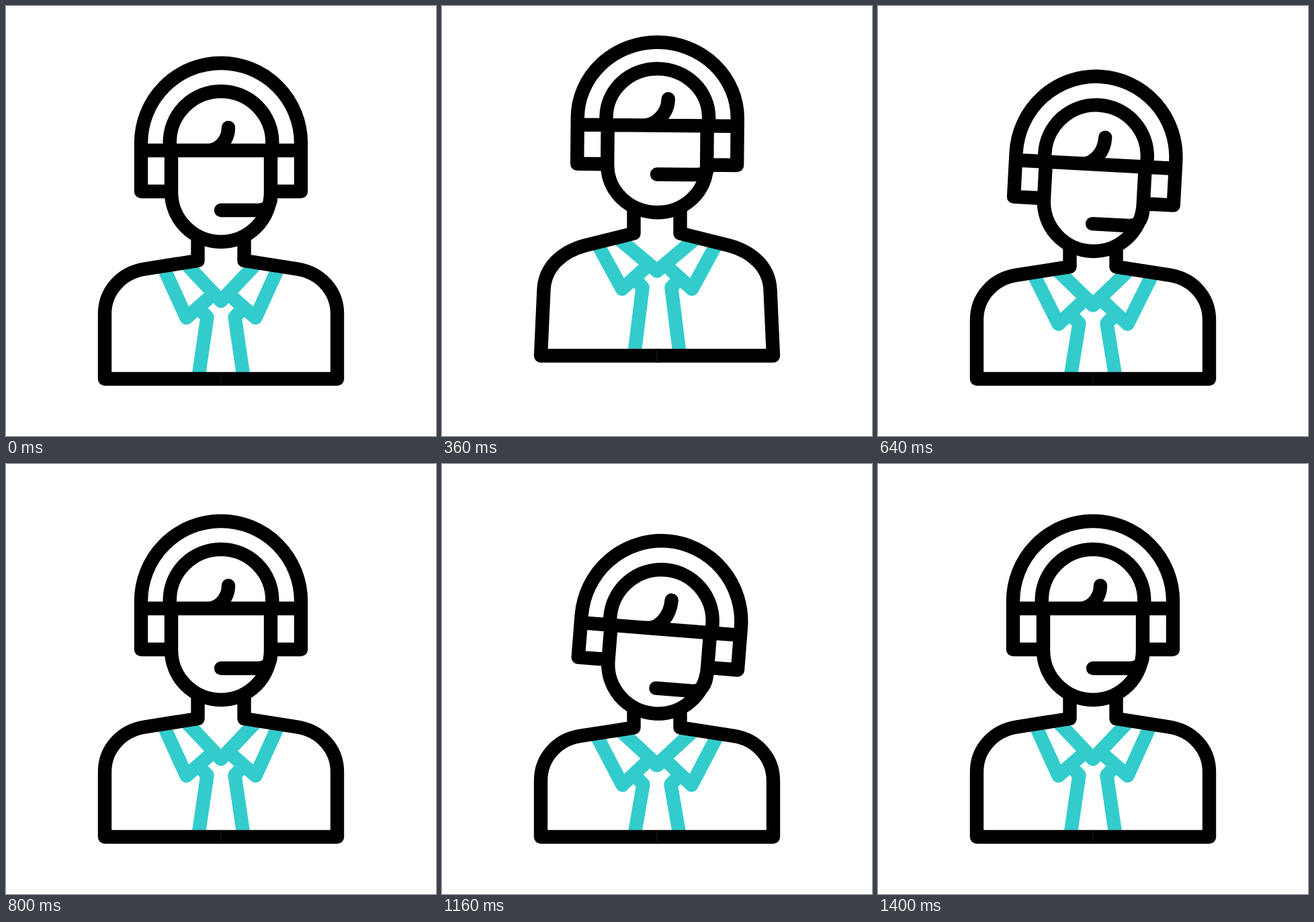
Write an HTML page that moves like this. It is 640 px wide and 640 px high and loops after 1480 ms.

```html
<!DOCTYPE html>
<html lang="en">
<head>
<meta charset="utf-8">
<title>Support agent</title>
<style>
  html, body { margin: 0; height: 100%; overflow: hidden; background: #fff; }
  svg { display: block; width: 100%; height: 100%; }
  path { fill: none; stroke: #000; stroke-width: 20.4; stroke-linejoin: round; }
  #body, #head { stroke-linecap: round; }
  #shirt { stroke: #3cc; }
  #seam { stroke: #fff; stroke-opacity: .16; stroke-width: .8; }
</style>
</head>
<body>
<svg viewBox="0 0 640 640">
  <g id="half">
    <path id="shirt"/>
    <path id="body"/>
  </g>
  <use href="#half" transform="matrix(-1 0 0 1 640 0)"/>
  <path id="seam"/>
  <path id="head"/>
</svg>
<script>
const LOOP = 1480, STEP = 40;
const $ = id => document.getElementById(id);

// [time, lift, nod]
const KEYS = [
  [0, 0, 0], [120, 0, 0], [320, 1, 0], [520, 0, 1], [800, 0, 0],
  [1000, 0, 0], [1200, 0, 1], [1400, 0, 0], [LOOP, 0, 0]
];

function poseAt(t) {
  const i = KEYS.findIndex(key => key[0] > t);
  const [t0, lift0, nod0] = KEYS[i - 1], [t1, lift1, nod1] = KEYS[i];
  const p = (t - t0) / (t1 - t0), s = p * p * (3 - 2 * p);
  return { lift: lift0 + (lift1 - lift0) * s, nod: nod0 + (nod1 - nod0) * s };
}

function draw(t) {
  const { lift, nod } = poseAt(t);
  // A rest value plus its shifts at full lift and full nod.
  const mix = (rest, up, down) => rest + up * lift + down * nod;
  const pt = (x, y, upX, upY, downX, downY) =>
    `${mix(x, upX, downX)} ${mix(y, upY, downY)} `;

  // Left half of the torso; the right half is mirrored.
  const base = mix(555, -38.5, 0);
  $('body').setAttribute('d',
    'M' + pt(285.5, 345, 0, -47.5, 0, 23.5) +
    'L' + pt(285.5, 379, 0, -47, 0, 15) +
    'L' + pt(206, 391.5, 8, -41, -1, 15) +
    'C' + pt(172, 397, 8, -37, -1, 15) +
          pt(147, 424, 7, -42, 0, 15) +
          pt(147, 458, 5, -42, 0, 15) +
    `L147 ${base}H320`);

  $('shirt').setAttribute('d',
    'M' + pt(268, 384, -8, -46, -2, 15) +
    'L' + pt(320, 439, 0, -51, 1, 10.5) +
    'L' + pt(323, 436, 0, -51, 1, 10.5) +
    'M' + pt(233, 386, -2, -39, -5, 17) +
    'L' + pt(268.5, 464, -.5, -49.5, 0, 15.5) +
    'L' + pt(305, 432, 0, -51, 0, 12.5) +
    'M' + pt(288, 451, 0, -51, 0, 15.5) +
    'L' + pt(299.5, 463, -1, -51, 0, 15.5) +
    `L286 ${base}`);

  $('seam').setAttribute('d', `M320 ${base - 10}v20`);

  // Head, measured from the middle of the ear pads' lower edge.
  const band = mix(-191, 9, 9), hair = mix(-149, 6, 10), brow = mix(-61, 2, 10.4);
  const chin = mix(75, -4, -.5), mic = mix(28, -16, 9.7);
  const curlX = mix(11, 5, 2), curlY = mix(-95, -3, -.6);
  const dome = (radius, start, top) =>
    `V${start}A${radius} ${start - top} 0 0 1 ${radius} ${start}`;

  $('head').setAttribute('d',
    `M-74 0H-119${dome(119, brow - 11, band)}V0H74` +
    `M-119 ${brow}H119` +
    `M-76.3 ${brow}${dome(76.3, brow - 12, hair)}V${brow}` +
    `M-74 ${brow}V1A74 ${chin - 1} 0 0 0 74 1V${brow}` +
    `M0 ${mic}H54Q74 ${mic} 74 8` +
    `M${curlX} ${curlY}C${curlX} ${curlY + (brow - curlY) * .55} -3 ${brow} -20 ${brow}`);
  $('head').setAttribute('transform',
    `translate(${pt(320, 276, 0, -47.5, 1.5, 23.5)}) rotate(${5.06 * nod})`);
}

function tick() {
  draw(Math.floor(performance.now() % LOOP / STEP) * STEP);
  requestAnimationFrame(tick);
}
tick();
</script>
</body>
</html>
```
